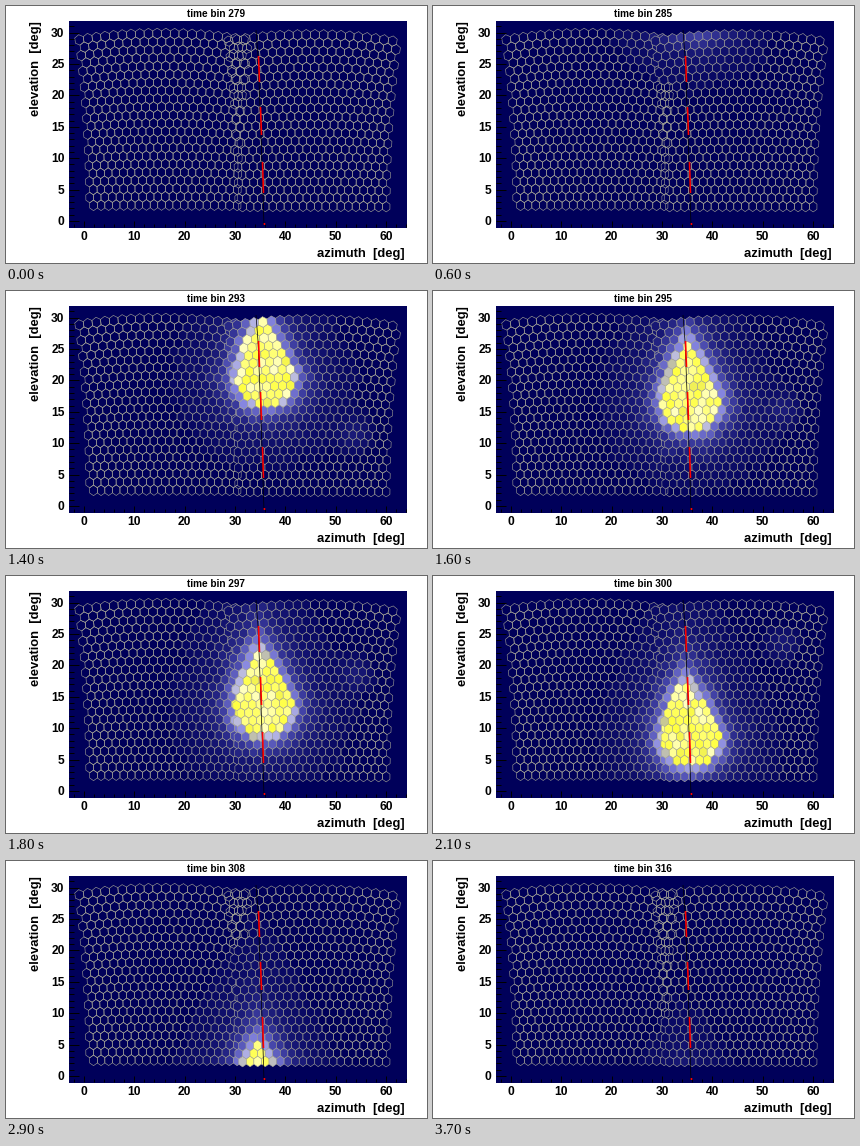
These frames come from a looping animation (421 px wide and 257 px high, 3.8 s). A matplotlib script:

```python
import numpy as np
import matplotlib.pyplot as plt
from matplotlib.animation import FuncAnimation
from matplotlib.collections import LineCollection, PolyCollection
from matplotlib.colors import LinearSegmentedColormap
from matplotlib.patches import Rectangle

W, H, DPI = 421, 257, 100
FRAMES, INTERVAL, FIRST_BIN = 38, 100, 279
LEFT, RIGHT, TOP, BOTTOM = 63, 400, 15, 221
PX = 72 / DPI
NAVY = (0, 0, 90 / 255)

palette = LinearSegmentedColormap.from_list("signal", [
    (0, NAVY), (0.25, "#4444a8"), (0.45, "#8686e0"), (0.58, "#bcbce4"),
    (0.68, "#c0c0a0"), (0.76, "#ffff40"), (0.9, "#ffff70"), (1, "#ffffc0")])


def to_px(azimuth, elevation):
    return 78 + 5.035 * np.asarray(azimuth), 215 - 6.28 * np.asarray(elevation)


def project(alpha, beta, axis_azimuth, axis_elevation):
    """Camera angles of a tilted telescope, to stage pixels."""
    a, b = np.radians(alpha), np.radians(beta + axis_elevation)
    elevation = np.degrees(np.arcsin(np.cos(a) * np.sin(b)))
    azimuth = axis_azimuth + np.degrees(np.arctan(np.tan(a) / np.cos(b)))
    return to_px(azimuth, elevation)


def camera(*axis, pitch=1.5, rows=22, cols=20):
    row, col = np.divmod(np.arange(rows * cols), cols)
    alpha = (col - 9 - 0.5 * (row % 2)) * pitch
    beta = (row - (rows - 1) / 2) * pitch * np.sqrt(3) / 2
    corner = np.radians(30 + 60 * np.arange(6))
    radius = pitch / np.sqrt(3)
    x, y = project(alpha[:, None] + radius * np.cos(corner),
                   beta[:, None] + radius * np.sin(corner), *axis)
    return np.stack([x, y], axis=-1)


cells = np.concatenate([camera(15.4, 16.2), camera(45, 16)])
cx, cy = cells.mean(axis=1).T


def signal(i):
    """Palette position of every cell: a teardrop falling along the track."""
    y0 = np.interp(FIRST_BIN + i, [279, 285, 290, 295, 300, 308, 316],
                   [-85, -11, 48, 109, 161, 239, 315])
    x0 = np.interp(y0, [48, 109, 239], [261, 258, 256])
    dy = cy - y0
    lean = np.clip(-dy / 57, 0, 1)
    dx = np.abs(cx - x0 + 5 * lean) / 29
    ahead = np.hypot(dx, dy / 30)
    behind = (dx ** 1.25 + (np.abs(dy) / 57) ** 1.25) ** 0.8
    q = np.where(dy > 0, ahead, behind)

    rng = np.random.default_rng(500 + i)
    edge = np.maximum(q - 1, 0)
    halo = 0.5 * np.exp(-3.2 * edge) + 0.14 * np.exp(-0.8 * edge)
    halo *= 1 + 0.08 * rng.standard_normal(len(q))
    core = 0.74 + 0.26 * rng.random(len(q))
    level = np.where(q < 1, core, halo)

    # Faint reflection, mirrored through the centre of the right camera.
    if y0 > 20:
        gx, gy = 608 - x0, 228 - y0
        level += 0.08 * np.exp(-((cx - gx) ** 2 + (cy - gy) ** 2) / 250)
    return np.clip(np.where(level < 0.025, 0, level), 0, 1)


fig = plt.figure(figsize=(W / DPI, H / DPI), dpi=DPI, facecolor="white")
ax = fig.add_axes([0, 0, 1, 1], xlim=(0, W), ylim=(H, 0))
ax.axis("off")


def text(x, y, label, size, **kw):
    kw = {"ha": "center", "va": "center_baseline", **kw}
    return ax.text(x, y, label, fontsize=size * PX, weight="bold",
                   family="Liberation Sans", **kw)


def lines(segments, color, width, zorder):
    ax.add_collection(LineCollection(segments, colors=color, linewidths=width * PX,
                                     capstyle="butt", zorder=zorder))


ax.add_patch(Rectangle((LEFT, TOP), RIGHT + 1 - LEFT, BOTTOM + 1 - TOP,
                       facecolor=NAVY, edgecolor="none", antialiased=False))
hexagons = PolyCollection(cells, edgecolors="#aaaa98", linewidths=0.55 * PX, zorder=2)
ax.add_collection(hexagons)

ticks = []
for az in range(-2, 65, 2):
    x = to_px(az, 0)[0]
    ticks.append([(x, BOTTOM), (x, BOTTOM - (6 if az % 10 == 0 else 3))])
    if az >= 0 and az % 10 == 0:
        text(x, 229.5, str(az), 12)
for el in range(0, 32):
    y = to_px(0, el)[1]
    ticks.append([(LEFT, y), (LEFT + (10 if el % 5 == 0 else 5), y)])
    if el % 5 == 0:
        text(58.5, y - 0.5, str(el), 12, ha="right")
lines(ticks, "black", 1, 4)

track_y = [24, 50, 101, 156, 219]
track_x = [250, 252, 254, 256, 258]
lines([list(zip(track_x, track_y))], "black", 0.7, 5)
lines([[(np.interp(y, track_y, track_x) + 0.5, y) for y in ends]
       for ends in [(50, 76), (101, 129), (156, 187), (217, 219)]], "red", 1.6, 6)

text(399, 247, "azimuth  [deg]", 13, ha="right")
text(30, 15.5, "elevation  [deg]", 13, rotation=90, va="top")
title = text(210, 7, "", 10)


def update(i):
    level = signal(i)
    colors = palette(level)
    colors[level == 0, 3] = 0
    hexagons.set_facecolor(colors)
    title.set_text(f"time bin {FIRST_BIN + i}")
    return hexagons, title


anim = FuncAnimation(fig, update, frames=FRAMES, interval=INTERVAL,
                     repeat=True, repeat_delay=0)
plt.show()
```
